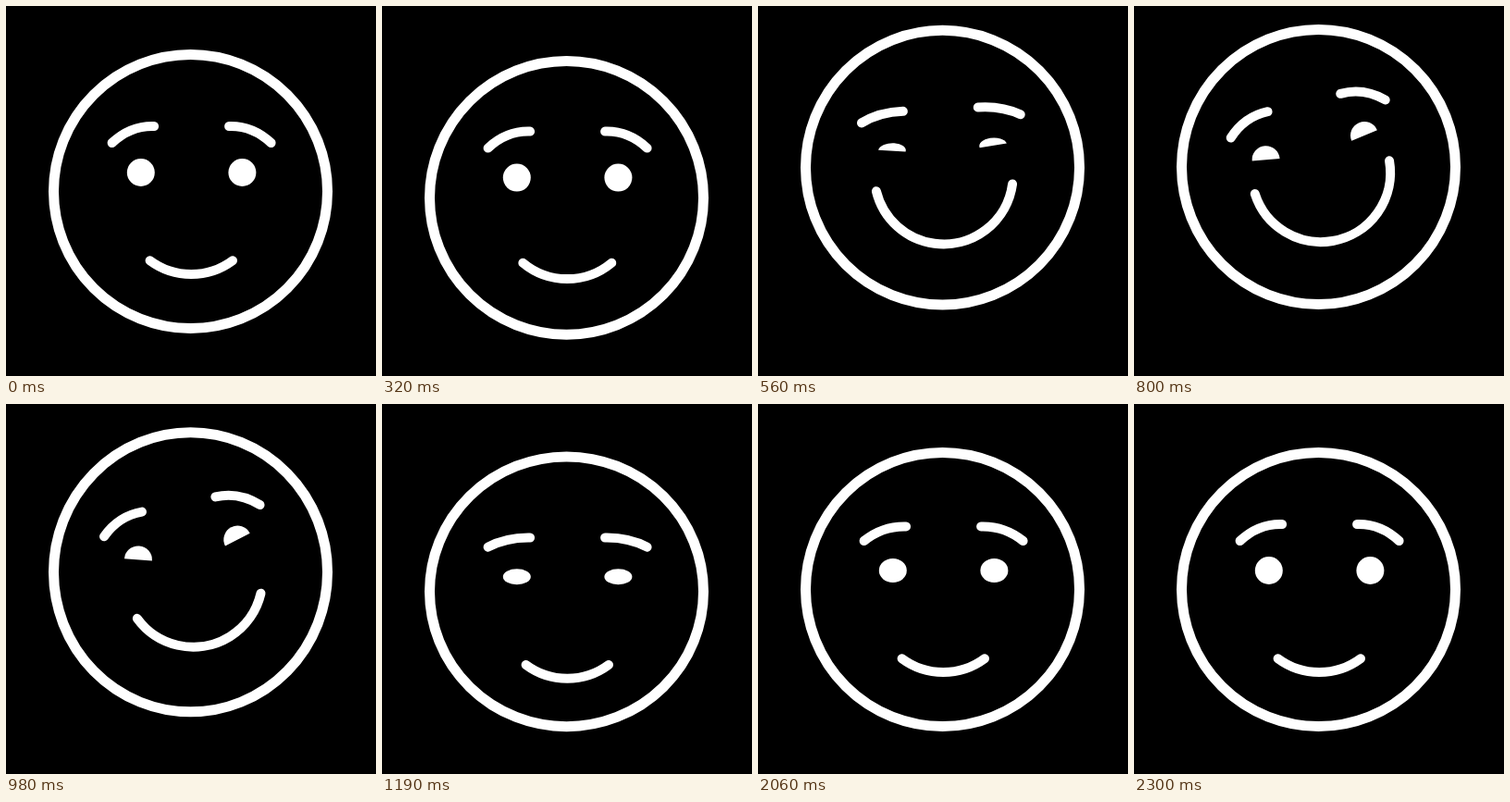
Recreate the animation shown at these times as an HTML page with a canvas. Size 400 by 400 pixels, loop 3.38 s.

```html
<!DOCTYPE html>
<html lang="en">
<head>
<meta charset="utf-8">
<title>Smiling face</title>
<style>
  html, body { margin: 0; width: 100%; height: 100%; overflow: hidden; background: #000; }
  canvas { display: block; width: 100vmin; height: 100vmin; }
</style>
</head>
<body>
<canvas id="stage" width="400" height="400"></canvas>
<script>
const ctx = document.getElementById('stage').getContext('2d');
const LOOP = 3380, STEP = 30, FIRST_STEP = 230;
const RAD = Math.PI / 180;

// Tracks are [time in ms, value] keys, eased between neighbours.
const tracks = {
  headTop: [[230, 0], [300, 8], [490, -26], [800, -27], [940, -26.5], [1110, 8], [1310, -2], [1430, 0]],
  headBottom: [[230, 0], [310, 7], [535, -25.5], [800, -26], [905, -25.5], [1110, 7], [1200, 0]],
  faceY: [[230, 0], [357, 7], [580, -27], [800, -27.5], [930, -27], [1160, 7], [1400, 0]],
  tilt: [[470, 0], [770, 14], [800, 13.8], [920, 13.6], [1160, 0]],
  smile: [[260, 0], [650, 1], [820, 1], [1180, 0]],
  open: [[380, 1], [500, 0.13], [620, 1], [1010, 1], [1130, 0.13], [1250, 1],
         [2030, 1], [2150, 0.13], [2180, 0.13], [2300, 1]]
};

function valueAt(keys, t) {
  const next = keys.findIndex(([time]) => time > t);
  if (next === 0) return keys[0][1];
  if (next < 0) return keys[keys.length - 1][1];
  const [t0, v0] = keys[next - 1], [t1, v1] = keys[next];
  const p = (t - t0) / (t1 - t0);
  return v0 + (v1 - v0) * p * p * (3 - 2 * p);
}

function drawHead(top, bottom) {
  const y0 = 47 + top, y1 = 354 + bottom;
  ctx.lineWidth = 11;
  ctx.beginPath();
  ctx.ellipse(199.5, (y0 + y1) / 2, 148, (y1 - y0 - 11) / 2, 0, 0, 2 * Math.PI);
  ctx.stroke();
}

function drawBrow(side, open) {
  const y = rise => -52 - rise * open;
  ctx.beginPath();
  ctx.moveTo(side * 86, y(0));
  ctx.quadraticCurveTo(side * 66, y(18.8), side * 40.5, y(18));
  ctx.stroke();
}

function drawEye(side, open, half, lidAngle) {
  ctx.save();
  ctx.translate(side * 54.8, -20);
  ctx.scale(1, open);
  if (half) ctx.rotate(-side * lidAngle * RAD);
  ctx.beginPath();
  ctx.arc(0, 0, 15, half ? Math.PI : 0, 2 * Math.PI);
  ctx.fill();
  ctx.restore();
}

function drawMouth(smile) {
  const spread = (36.6 + 49.4 * smile) * RAD;
  ctx.beginPath();
  ctx.arc(-0.3, 15 - 7.3 * smile, 75, Math.PI / 2 - spread, Math.PI / 2 + spread);
  ctx.stroke();
}

function draw(t) {
  const at = name => valueAt(tracks[name], t);
  const open = at('open'), smile = at('smile');
  const half = t >= 500 && t < 1130;

  ctx.fillStyle = '#000';
  ctx.fillRect(0, 0, 400, 400);
  ctx.fillStyle = ctx.strokeStyle = '#fff';
  ctx.lineCap = 'round';
  drawHead(at('headTop'), at('headBottom'));

  ctx.save();
  ctx.translate(200.6, 200 + at('faceY'));
  ctx.rotate(-at('tilt') * RAD);
  ctx.lineWidth = 10;
  for (const side of [-1, 1]) {
    drawBrow(side, open);
    drawEye(side, open, half, 9 + 16 * (1 - smile));
  }
  drawMouth(smile);
  ctx.restore();
}

function tick() {
  const t = performance.now() % LOOP;
  draw(t < FIRST_STEP ? 0 : t - (t - FIRST_STEP) % STEP);
  requestAnimationFrame(tick);
}
tick();
</script>
</body>
</html>
```
